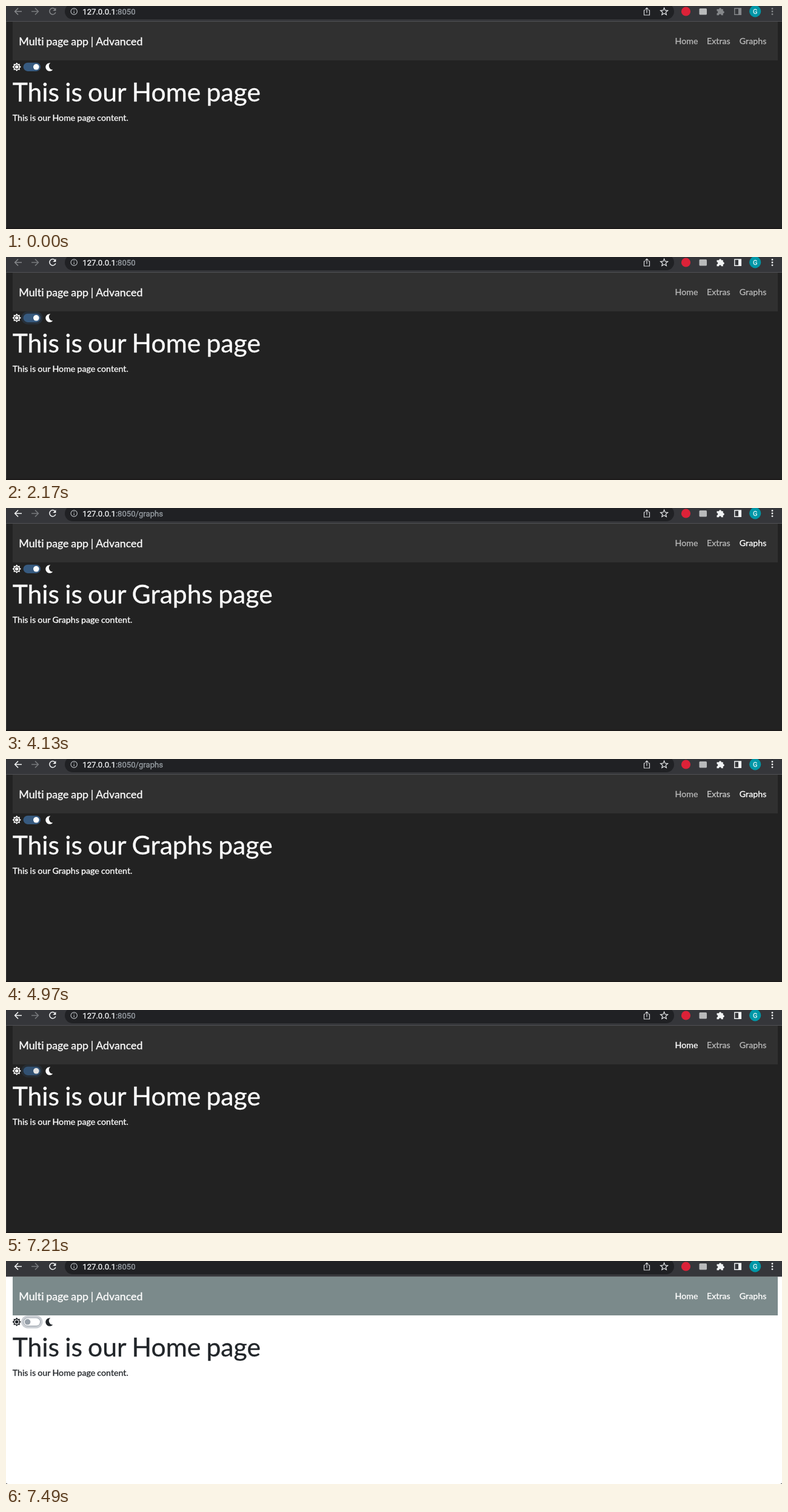
Recreate the animation shown at these times as an HTML page with a canvas. Size 1280 by 369 pixels, loop 8 s.

```html
<!DOCTYPE html>
<html lang="en">
<head>
<meta charset="utf-8">
<title>Multi page app</title>
<style>
  html, body { margin: 0; width: 100%; height: 100%; overflow: hidden; background: #222; }
  canvas { display: block; }
</style>
</head>
<body>
<canvas id="stage" width="1280" height="369"></canvas>
<script>
const ctx = document.getElementById('stage').getContext('2d');
const LOOP = 8000, TICK = 70;
const REM = 128 / 9;                    // 16px page text on a 1440px wide window
const LATO = 'Lato, sans-serif', UI = 'Roboto, sans-serif';
const ACTIVE_AT = 2170, LIGHT_AT = 7280;

const PAGES = [
  { from: 0, name: 'Home', path: '' },
  { from: 2800, name: 'Extras', path: '/extras' },
  { from: 4130, name: 'Graphs', path: '/graphs' },
  { from: 5880, name: 'Home', path: '' }
];

// Keys are [time, value], joined by straight lines.
const LINKS = [
  { name: 'Home', x: 1103.5, keys: [[5110, 0], [5250, 1], [7210, 1], [7280, .65], [7420, 1]] },
  { name: 'Extras', x: 1156, keys: [[2450, 0], [2590, 1], [3990, 1], [4130, 0], [4900, 0],
    [4970, .2], [5040, 1], [5110, 1], [5250, 0], [7280, 0], [7420, 1]] },
  { name: 'Graphs', x: 1209.8, keys: [[3150, 0], [3290, 1], [5670, 1], [5810, 0], [7280, 0], [7420, 1]] }
];
const RING = [[2100, 0], [2170, 1], [2590, 1], [2800, 0], [7140, 0], [7210, .8], [7280, 1]];
const KNOB = [[7280, 49.8], [7350, 46], [7420, 38], [7490, 35.6]];

function at(keys, t) {
  if (t <= keys[0][0]) return keys[0][1];
  for (let i = 1; i < keys.length; i++) {
    const [t0, a] = keys[i - 1], [t1, b] = keys[i];
    if (t <= t1) return a + (b - a) * (t - t0) / (t1 - t0);
  }
  return keys[keys.length - 1][1];
}

function rect(x, y, w, h, color) {
  ctx.fillStyle = color;
  ctx.fillRect(x, y, w, h);
}

function pill(x, y, w, h, r, color) {
  ctx.fillStyle = color;
  ctx.beginPath();
  ctx.roundRect(x, y, w, h, r);
  ctx.fill();
}

function disc(x, y, r, color) {
  ctx.fillStyle = color;
  ctx.beginPath();
  ctx.arc(x, y, r, 0, 7);
  ctx.fill();
}

// The hairline outline gives the slightly heavier look of smoothed screen text.
function text(str, x, y, size, family, color) {
  ctx.font = `${size}px ${family}`;
  ctx.wordSpacing = family === LATO ? `${-.043 * size}px` : '0px';
  ctx.letterSpacing = '0.01px';         // any spacing turns ligatures off
  ctx.fillStyle = ctx.strokeStyle = color;
  ctx.lineWidth = .3;
  ctx.fillText(str, x, y);
  ctx.strokeText(str, x, y);
  return x + ctx.measureText(str).width;
}

function stroke(d, color, width = 1.5) {
  ctx.strokeStyle = color;
  ctx.lineWidth = width;
  ctx.stroke(new Path2D(d));
}

function fill(d, color) {
  ctx.fillStyle = color;
  ctx.fill(new Path2D(d));
}

function star(x, y, points, outer, inner) {
  ctx.beginPath();
  for (let i = 0; i < points * 2; i++) {
    const a = i * Math.PI / points - Math.PI / 2, r = i % 2 ? inner : outer;
    ctx.lineTo(x + r * Math.cos(a), y + r * Math.sin(a));
  }
  ctx.closePath();
}

function drawToolbar(t, page) {
  const bright = '#f1f3f4', dim = '#85878a';
  const focus = t >= ACTIVE_AT ? bright : dim;

  rect(0, 0, 1280, 25, '#35363a');
  rect(0, 25, 1280, 1, '#505154');
  pill(97, -4, 1005, 26, 13, '#202124');

  stroke('M26 9H14.8M20 3.6L14.6 9L20 14.4', t >= PAGES[1].from ? bright : dim);
  stroke('M42 9H53.2M48 3.6L53.4 9L48 14.4', '#77797c');
  stroke('M81.2 5.6A5.2 5.2 0 1 0 81.9 10.6', focus);
  fill('M82.4 3V8H77.4Z', focus);

  stroke('M117.4 9A5.2 5.2 0 1 1 107 9A5.2 5.2 0 1 1 117.4 9M112.2 8.4V12M112.2 5.8V7.1', '#b4b8bc', 1.2);
  const end = text('127.0.0.1', 126.3, 13.5, 13.1, UI, bright);
  text(':8050' + page.path, end, 13.5, 13.1, UI, '#9aa0a6');

  stroke('M1054.5 7H1052.5V15H1061.5V7H1059.5M1057 11.5V3.2M1054.4 5.6L1057 3L1059.6 5.6', '#d5d7da', 1.2);
  star(1085.6, 9.4, 5, 6.3, 2.8);
  ctx.strokeStyle = '#e4e6e8';
  ctx.lineWidth = 1.2;
  ctx.stroke();

  disc(1121.5, 9, 7.6, '#dc2238');
  pill(1143.5, 4, 12.5, 10.5, 1.5, '#b9babb');

  fill('M1172.5 5.2H1176A2 2 0 1 1 1180 5.2H1182.8V8.3A2 2 0 1 1 1182.8 12.3V15.2H1179.8' +
       'A1.9 1.9 0 0 0 1176 15.2H1172.5V12A1.9 1.9 0 0 0 1172.5 8.2Z', focus);
  stroke('M1201.8 4H1212.4V14.2H1201.8Z', focus, 1.4);
  rect(1208, 4, 4.6, 10.2, focus);

  disc(1235.7, 8.8, 9.6, '#0097a7');
  ctx.textAlign = 'center';
  text('G', 1235.7, 12.7, 11, UI, '#e8f6f7');
  ctx.textAlign = 'left';
  for (const y of [4.4, 9, 13.6]) disc(1264, y, 1.4, focus);
}

function drawNavbar(t, light) {
  rect(11, 26, 1262, 64, light ? '#7b8a8b' : '#303030');
  text('Multi page app | Advanced', 21.3, 64.6, REM * 1.25, LATO, '#fff');
  for (const link of LINKS) {
    const alpha = .6 + .4 * at(link.keys, t);
    text(link.name, link.x, 63.3, REM, LATO, `rgba(255,255,255,${alpha})`);
  }
}

function drawSwitch(t, light, ink, paper) {
  star(17.7, 100.8, 8, 7.2, 5.2);
  ctx.fillStyle = ink;
  ctx.fill();
  disc(17.7, 100.8, 3.9, paper);
  disc(17.7, 100.8, 2.7, ink);
  fill('M73.2 94.3A6.8 6.8 0 1 0 77.2 105.5A6.3 6.3 0 0 1 73.2 94.3Z', ink);

  const ring = at(RING, t), pressed = t >= 7210 && !light;
  const tint = light ? '44,62,80' : '55,90,127';
  const x = 28.6, y = 93.7, w = REM * 2, h = REM;
  if (ring) pill(x - 3.5, y - 3.5, w + 7, h + 7, h / 2 + 3.5, `rgba(${tint},${.25 * ring})`);
  pill(x, y, w, h, h / 2, light ? '#969fa8' : pressed ? '#325172' : '#375a7f');
  if (light) pill(x + .9, y + .9, w - 1.8, h - 1.8, h / 2 - .9, '#fff');
  disc(at(KNOB, t), y + h / 2, 4.8, light ? '#969fa8' : pressed ? '#e2e2e2' : '#fff');
}

function draw(t) {
  const light = t >= LIGHT_AT;
  const page = PAGES.filter(p => p.from <= t).pop();
  const paper = light ? '#fff' : '#222', ink = light ? '#212529' : '#fff';

  rect(0, 0, 1280, 369, paper);
  drawToolbar(t, page);
  drawNavbar(t, light);
  drawSwitch(t, light, ink, paper);
  text(`This is our ${page.name} page`, 10.7, 157.8, REM * 3, LATO, ink);
  text(`This is our ${page.name} page content.`, 10.7, 189.7, REM, LATO, ink);

  if (light) {
    rect(0, 368, 2, 1, '#555');
    rect(1278, 368, 2, 1, '#555');
  } else {
    rect(0, 26, 1, 343, '#3c3c3c');
    rect(0, 367, 1280, 2, '#1c1a1a');
  }
}

const start = performance.now();
function frame() {
  const t = (performance.now() - start) % LOOP;
  draw(Math.floor(t / TICK + .001) * TICK);
  requestAnimationFrame(frame);
}
frame();
</script>
</body>
</html>
```
